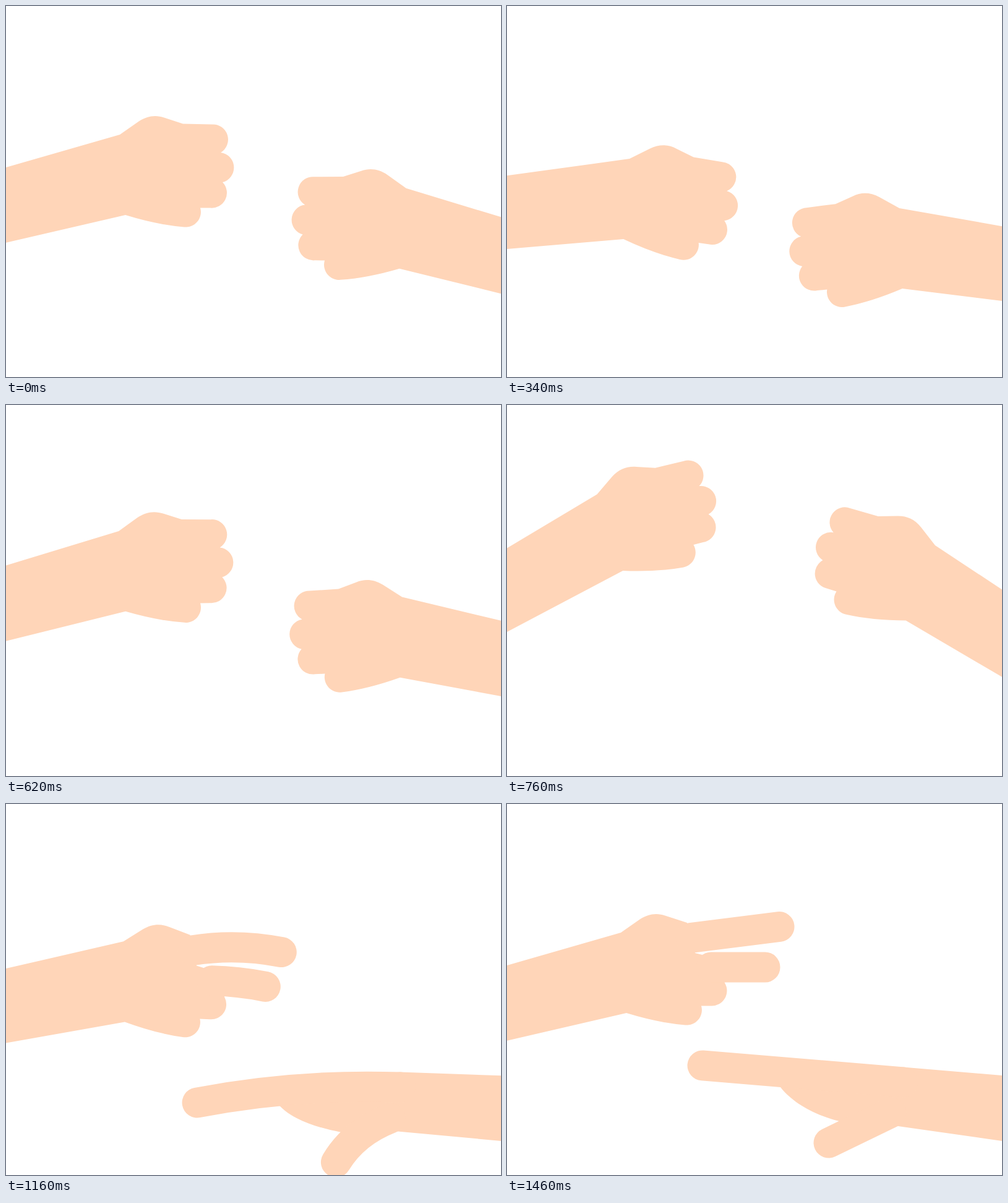
Recreate the animation shown at these times as an HTML page. Size 800x600 px, loop 1.48 s.

```html
<!DOCTYPE html>
<html lang="en">
<head>
<meta charset="utf-8">
<title>Rock paper scissors</title>
<style>
  html, body { margin: 0; width: 100%; height: 100%; overflow: hidden; background: #fff; }
  svg { display: block; width: 100vw; height: 100vh; }
  .palm { fill: #ffd5b8; }
  .fingers { fill: none; stroke: #ffd5b8; stroke-width: 49; stroke-linecap: round; }
</style>
</head>
<body>
<svg viewBox="0 0 800 600">
  <g id="left"><path class="palm"/><path class="fingers"/></g>
  <g id="right"><path class="palm"/><path class="fingers"/></g>
</svg>
<script>
const LOOP = 1480, STEP = 20, REVEAL = 1100;

// Side-on hand: arm, knuckles, folded ring and little fingers
const ARC = 'A24.5 24.5 0 0 1 ';
const sideHand = front => `M-100 289.8 L184 208 L214 187 C229 177 243 176 257 181 ${front}
  ${ARC}330 326.5 L314 326.5 ${ARC}288 357.5 Q245 354 193 338 L-100 406 Z`;

// Each hand is a filled palm plus thick strokes for stretched fingers; b is their bend
const rock = () => ({
  palm: sideHand(`L286 190.5 L333 191.5 ${ARC}347 237 ${ARC}350 285`),
  fingers: ''
});

const scissors = b => ({
  palm: sideHand('L291 192 L304 241 L340 250 L352 289.5'),
  fingers: `M297 216.5 Q366 ${207.5 - 6 * b} 440 ${198.5 + 13.5 * b}
    M330 264 Q372 ${264 - 1.5 * b} 417 ${264 + 5 * b}`
});

const paper = b => ({
  palm: `M1000 456 L640 425.4 L442 440 V${458 + 11 * b}
    C462 ${484 + 9 * b} 500 ${504 + 4 * b} ${537 + 4 * b} ${513 + 5 * b} L632 521 L1000 573.5 Z`,
  fingers: `M640 449.9 Q473 435.7 ${316 - 5.5 * b} ${422.9 + 36 * b}
    M621 499 Q${570 - 9 * b} ${523.5 - 4.5 * b} ${520 + 10 * b} ${548 + 18 * b}`
});

// Turning points as [ms, value]; positive angles swing down
const leftSwing = [[0, 0], [140, -9], [370, 9], [430, 9], [956, -25.2], [1200, 5], [1460, 0]];
const rightSwing = [[0, -.8], [150, -8.5], [395, 8], [530, 8], [868, -25], [935, -25], [1193, 4], [1460, 0]];
const rightDrop = [[710, 0], [1240, 95]];
const fingerBend = [[1080, -.5], [1165, 1], [1380, 0]];

// Sine easing from one turning point to the next
function at(keys, t) {
  const i = keys.findIndex(k => k[0] > t);
  if (i < 0) return keys[keys.length - 1][1];
  if (i === 0) return keys[0][1];
  const [t0, v0] = keys[i - 1], [t1, v1] = keys[i];
  return v0 + (v1 - v0) * (1 - Math.cos(Math.PI * (t - t0) / (t1 - t0))) / 2;
}

function pose(id, hand, transform) {
  const g = document.getElementById(id);
  g.setAttribute('transform', transform);
  g.children[0].setAttribute('d', hand.palm);
  g.children[1].setAttribute('d', hand.fingers);
}

function draw(t) {
  const open = t >= REVEAL, bend = at(fingerBend, t);
  const angle = at(rightSwing, t), drop = at(rightDrop, t);
  pose('left', open ? scissors(bend) : rock(), `rotate(${at(leftSwing, t)} -80 325)`);
  if (open) pose('right', paper(bend), `translate(0 ${drop - 95}) rotate(${-angle} 909 504)`);
  else pose('right', rock(), `translate(829 ${90.5 + drop}) scale(-1 1) rotate(${angle} -80 325)`);
}

const start = performance.now();
function tick() {
  const t = (performance.now() - start) % LOOP;
  draw(Math.floor(t / STEP) * STEP);
  requestAnimationFrame(tick);
}
tick();
</script>
</body>
</html>
```
